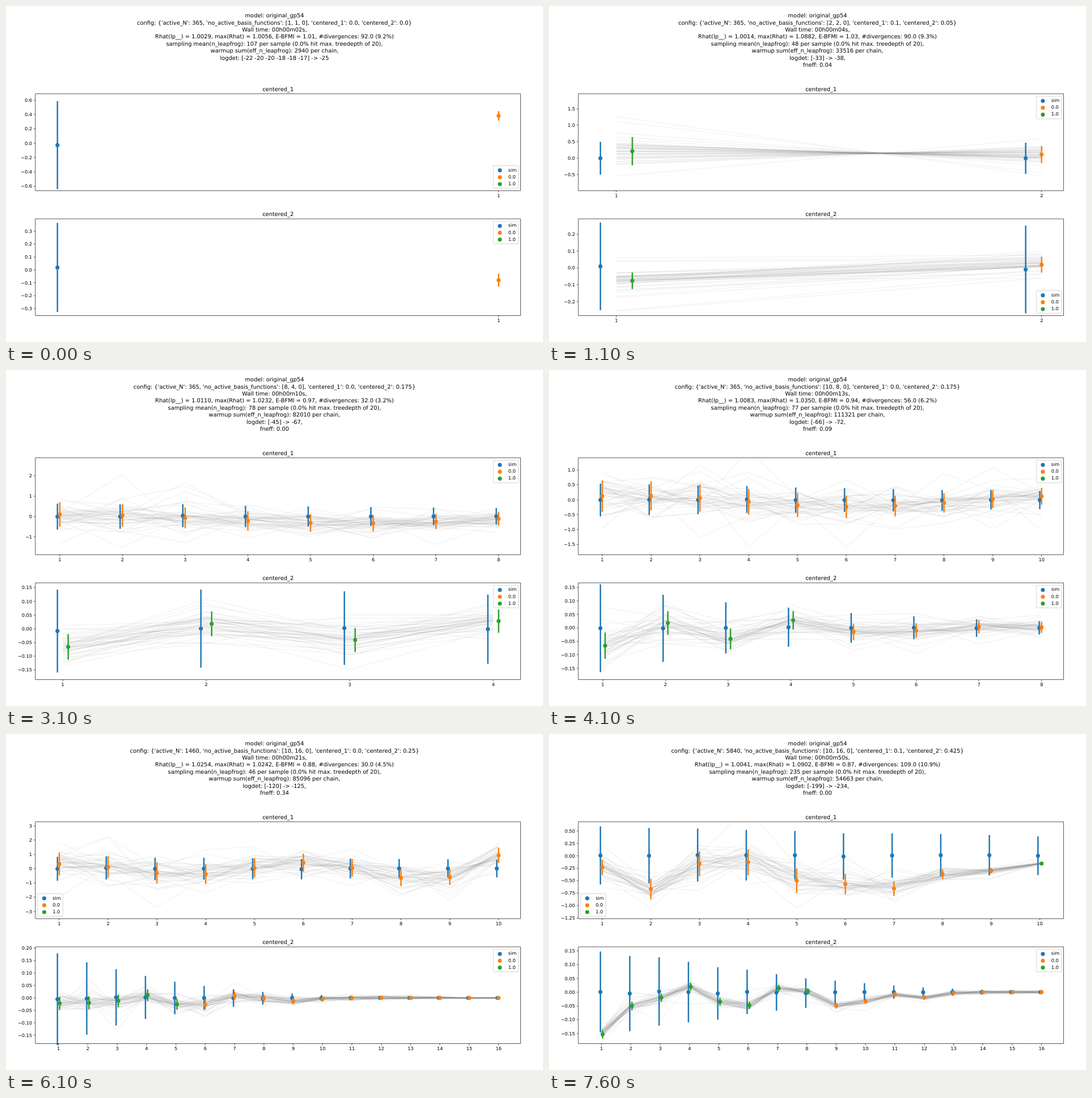
Recreate the animation shown at these times as an HTML page with a canvas. Size 947 by 592 pixels, loop 8 s.

```html
<!DOCTYPE html>
<html>
<head>
<meta charset="utf-8">
<style>
html, body { margin: 0; width: 100%; height: 100%; overflow: hidden; background: #fff; }
canvas { display: block; }
</style>
</head>
<body>
<canvas id="stage" width="947" height="592"></canvas>
<script>
// The figure is laid out on 1600 x 1000 units and scaled down to the stage.
const ctx = document.getElementById('stage').getContext('2d');
ctx.scale(947 / 1600, 592 / 1000);
ctx.textRendering = 'geometricPrecision';

const BLUE = '#1f77b4', ORANGE = '#ff7f0e', GREEN = '#2ca02c';
const LEFT = 87.5, WIDTH = 1446, HEIGHT = 288, OFFSET = 0.0375;
const TITLE = 16.67, LABEL = 13.89;

const decay = (start, rate, curve = 0) => i => start * Math.exp(-rate * i - curve * i * i);
const wave = (mid, size, shift) => i => mid + size * Math.cos(.69 * (i - shift));
const points = (...values) => i => values[i] ?? 0;

// kinds: one letter per coefficient, G = centered (green), O = not (orange)
const panel = (kinds, lo, hi, simSd, mean, sd, corr = .1) => ({ kinds, lo, hi, simSd, mean, sd, corr });

const earlyMeans = points(-.066, .018, -.041, .028, -.015, -.01, .004, .002);
const lateUpper = points(.33, .11, -.3, -.38, .05, .42, .06, -.65, -.59, .93);
const lateLower = points(-.022, -.02, -.012, .011, -.026, -.027, .009, -.002, -.013, -.004);

const up1 = panel('O', -.662, .687, decay(.614, 0), points(.38), decay(.066, 0));
const up2 = panel('GO', -.992, 1.957, decay(.5, .05), points(.21, .11), decay(.43, .5), -.998);
const up8 = panel('O'.repeat(8), -1.874, 2.883, decay(.64, .065), wave(-.12, .22, .1), decay(.6, .08));
const up4 = { ...up8, kinds: 'OOOO' };
const up10 = panel('O'.repeat(10), -1.842, 1.408, decay(.55, .065), wave(-.05, .19, .6), decay(.53, .07));
const up10b = panel(up10.kinds, -2.9, 3.164, decay(.8, .032), lateUpper, decay(.72, .045));
const up10c = panel(up10.kinds, -3.505, 3.28, decay(.84, .033), lateUpper, decay(.8, .045));
const up10d = panel('O'.repeat(9) + 'G', -1.266, .685, decay(.585, .045),
  points(-.23, -.67, -.16, -.13, -.5, -.57, -.66, -.37, -.3, -.155), decay(.155, -.36, .061));

const low1 = panel('O', -.355, .396, decay(.346, 0), points(-.08), decay(.05, 0));
const low1c = { ...low1, kinds: 'G' };
const low2 = panel('GO', -.2828, .2906, decay(.26, 0), points(-.076, .019), decay(.049, .04), .3);
const low4 = panel('GGGG', -.1852, .1672, decay(.151, .06), earlyMeans, decay(.0465, .03), .3);
const low4o = { ...low4, kinds: 'GGOO' };
const low8 = panel('GGGGOOOO', -.192, .167, decay(.163, .27), earlyMeans, decay(.049, .12));
const low8b = panel(low8.kinds, -.21, .221, decay(.2, .25, .016), lateLower, decay(.0265, 0, .016));
const low16 = panel('G'.repeat(5) + 'O'.repeat(11), -.184, .2055, decay(.185, .23, .0077), lateLower, decay(.0265, 0, .012));
const low16d = panel('G'.repeat(8) + 'O'.repeat(8), -.187, .1647, decay(.147, .06, .012),
  points(-.153, -.05, -.02, .02, -.035, -.048, .014, .003, -.049, -.033, -.008, -.019, -.003), decay(.0155, 0, .0065));

// upper and lower panel, each with its legend corner (upper/lower, left/right)
const scenes = [
  [up1, 'LR', low1, 'UR'], [up1, 'LR', low1c, 'UR'], [{ ...up2, kinds: 'OO' }, 'UR', low1c, 'UR'],
  [up2, 'UR', low2, 'LR'], [up4, 'UR', low4o, 'LR'], [up4, 'UR', low4o, 'LR'], [up8, 'UR', low4o, 'LR'],
  [up8, 'UR', low4, 'UR'], [up10, 'UR', low4, 'LR'],
  [up10, 'UR', low8, 'UR'], [up10, 'UR', low8, 'UR'],
  [up10b, 'LR', low8b, 'UR'], [up10b, 'LL', low8b, 'UR'],
  [up10c, 'LL', low16, 'UR'], [up10d, 'LR', low16d, 'UR'], [up10d, 'LR', low16d, 'UR'],
  [up10d, 'LL', low16d, 'UR'],
];

// stats: seconds, Rhat, max Rhat, E-BFMI, divergences, percent, leapfrogs, warmup, fneff
const runs = [
  { at: 0, size: 365, c1: '0.0', c2: '0.0', logdet: '[-22 -20 -20 -18 -18 -17] -> -25', stats: [2, 1.0029, 1.0056, 1.01, 92, 9.2, 107, 2940, 0] },
  { at: 3, size: 365, c1: '0.1', c2: '0.05', logdet: '[-33] -> -38,', stats: [4, 1.0014, 1.0882, 1.03, 90, 9.3, 48, 33516, .04] },
  { at: 7, size: 365, c1: '0.0', c2: '0.175', logdet: '[-45] -> -67,', stats: [10, 1.011, 1.0232, .97, 32, 3.2, 78, 82010, 0] },
  { at: 9, size: 365, c1: '0.0', c2: '0.175', logdet: '[-66] -> -72,', stats: [13, 1.0083, 1.035, .94, 56, 6.2, 77, 111321, .09] },
  { at: 11, size: 1460, c1: '0.0', c2: '0.175', logdet: '[-81] -> -102,', stats: [19, 1.0304, 1.0203, .88, 84, 8.4, 220, 40389, 0] },
  { at: 13, size: 1460, c1: '0.0', c2: '0.25', logdet: '[-120] -> -125,', stats: [21, 1.0254, 1.0242, .88, 30, 4.5, 46, 85096, .34] },
  { at: 16, size: 5840, c1: '0.1', c2: '0.425', logdet: '[-199] -> -234,', stats: [50, 1.0041, 1.0902, .87, 109, 10.9, 235, 54663, 0] },
];

function header(index, basis) {
  const next = runs.find(run => run.at >= index);
  const prev = runs.findLast(run => run.at <= index);
  const mix = (index - prev.at) / (next.at - prev.at || 1);
  const stat = (k, digits = 0) => (prev.stats[k] + (next.stats[k] - prev.stats[k]) * mix).toFixed(digits);
  const lines = [
    'model: original_gp54',
    `config: {'active_N': ${next.size}, 'no_active_basis_functions': [${basis}, 0], 'centered_1': ${next.c1}, 'centered_2': ${next.c2}}`,
    `Wall time: 00h00m${stat(0).padStart(2, '0')}s,`,
    `Rhat(lp__) = ${stat(1, 4)}, max(Rhat) = ${stat(2, 4)}, E-BFMI = ${stat(3, 2)}, #divergences: ${stat(4)}.0 (${stat(5, 1)}%)`,
    `sampling mean(n_leapfrog): ${stat(6)} per sample (0.0% hit max. treedepth of 20),`,
    `warmup sum(eff_n_leapfrog): ${stat(7)} per chain,`,
    `logdet: ${next.logdet}`,
  ];
  return index ? [...lines, `fneff: ${stat(8, 2)}`] : lines;
}

function text(string, x, y, size, align = 'center') {
  ctx.font = `${size}px "DejaVu Sans", sans-serif`;
  ctx.textAlign = align;
  ctx.fillStyle = '#000';
  ctx.fillText(string, x, y);
}

function stroke(path, color, width) {
  ctx.strokeStyle = color;
  ctx.lineWidth = width;
  ctx.beginPath();
  path.forEach(([x, y]) => ctx.lineTo(x, y));
  ctx.stroke();
}

function dot(x, y, color) {
  ctx.fillStyle = color;
  ctx.beginPath();
  ctx.arc(x, y, 6, 0, 2 * Math.PI);
  ctx.fill();
}

// Seeded bell-shaped numbers with long tails
function noise(seed) {
  const random = () => {
    seed = (seed * 1664525 + 1013904223) % 4294967296;
    return (seed + 1) / 4294967297;
  };
  return () => {
    const g = Math.sqrt(-2 * Math.log(random())) * Math.cos(2 * Math.PI * random());
    return .6 * g + .07 * g ** 3;
  };
}

const snap = v => Math.floor(v) + .5;

function drawLegend(corner, top) {
  const x = corner[1] === 'R' ? 1452 : 94.5, y = top + (corner[0] === 'U' ? 7 : 213.7);
  ctx.fillStyle = 'rgba(255,255,255,.8)';
  ctx.strokeStyle = '#ccc';
  ctx.lineWidth = 1.39;
  ctx.beginPath();
  ctx.roundRect(x, y, 75, 67.3, 2.8);
  ctx.fill();
  ctx.stroke();
  [['sim', BLUE], ['0.0', ORANGE], ['1.0', GREEN]].forEach(([label, color], i) => {
    dot(x + 19.4, y + 14 + 20.4 * i, color);
    text(label, x + 44.4, y + 17.4 + 20.4 * i, LABEL, 'left');
  });
}

function drawPanel(p, corner, top, title, seed) {
  const order = [...p.kinds.keys?.() ?? p.kinds].map((_, i) => i), n = order.length;
  const range = p.hi - p.lo, bottom = top + HEIGHT;
  const span = n - 1 + OFFSET * (p.kinds[n - 1] === 'G' ? 2 : 1);
  const px = i => LEFT + WIDTH * (1 / 22 + (i + OFFSET) / span / 1.1);
  const py = v => top + HEIGHT * (p.hi - v) / range;
  const next = noise(seed);

  ctx.save();
  ctx.beginPath();
  ctx.rect(LEFT, top, WIDTH, HEIGHT);
  ctx.clip();
  for (let k = 0; n > 1 && k < 45; k++) {
    let z = next();
    stroke(order.map(i => {
      if (i) z = p.corr * z + Math.sqrt(1 - p.corr ** 2) * next();
      return [px(i), py(p.mean(i) + p.sd(i) * z)];
    }), 'rgba(128,128,128,.1)', 2.08);
  }
  ctx.restore();

  const bar = (x, mean, sd, color) => {
    stroke([[x, py(mean - sd)], [x, py(mean + sd)]], color, 4.17);
    dot(x, py(mean), color);
  };
  order.forEach(i => bar(px(i - OFFSET), .04 * p.simSd(i) * next(), p.simSd(i), BLUE));
  order.forEach(i => p.kinds[i] === 'G'
    ? bar(px(i + OFFSET), p.mean(i), p.sd(i), GREEN)
    : bar(px(i), p.mean(i), p.sd(i), ORANGE));

  ctx.strokeStyle = '#000';
  ctx.lineWidth = 1.1;
  ctx.strokeRect(LEFT, top, WIDTH, HEIGHT);
  for (const i of order) {
    const x = snap(px(i));
    stroke([[x, bottom], [x, bottom + 5]], '#000', 1.1);
    text(i + 1, px(i), bottom + 20, LABEL);
  }
  const step = [.05, .1, .2, .25, .5, 1].find(s => s >= range / 9);
  const digits = step === 1 ? 0 : step * 10 % 1 ? 2 : 1;
  for (let k = Math.ceil(p.lo / step); k * step <= p.hi; k++) {
    const y = py(k * step);
    stroke([[LEFT, snap(y)], [LEFT - 5, snap(y)]], '#000', 1.1);
    text((k < 0 ? '\u2212' : '') + Math.abs(k * step).toFixed(digits), LEFT - 9.7, y + 5, LABEL, 'right');
  }
  text(title, LEFT + WIDTH / 2, top - 8.3, TITLE);
  drawLegend(corner, top);
}

function drawScene(index) {
  const [upper, upperCorner, lower, lowerCorner] = scenes[index];
  ctx.fillStyle = '#fff';
  ctx.fillRect(0, 0, 1600, 1000);
  header(index, `${upper.kinds.length}, ${lower.kinds.length}`)
    .forEach((line, i) => text(line, 800, 34 + 21 * i, TITLE));
  drawPanel(upper, upperCorner, 261.5, 'centered_1', 101 + index * 7919);
  drawPanel(lower, lowerCorner, 633.5, 'centered_2', 5003 + index * 6151);
}

let shown = -1;
function tick() {
  const index = Math.floor((performance.now() % 8000 + 400) / 500);
  if (index !== shown) drawScene(shown = index);
  requestAnimationFrame(tick);
}
tick();
</script>
</body>
</html>
```
